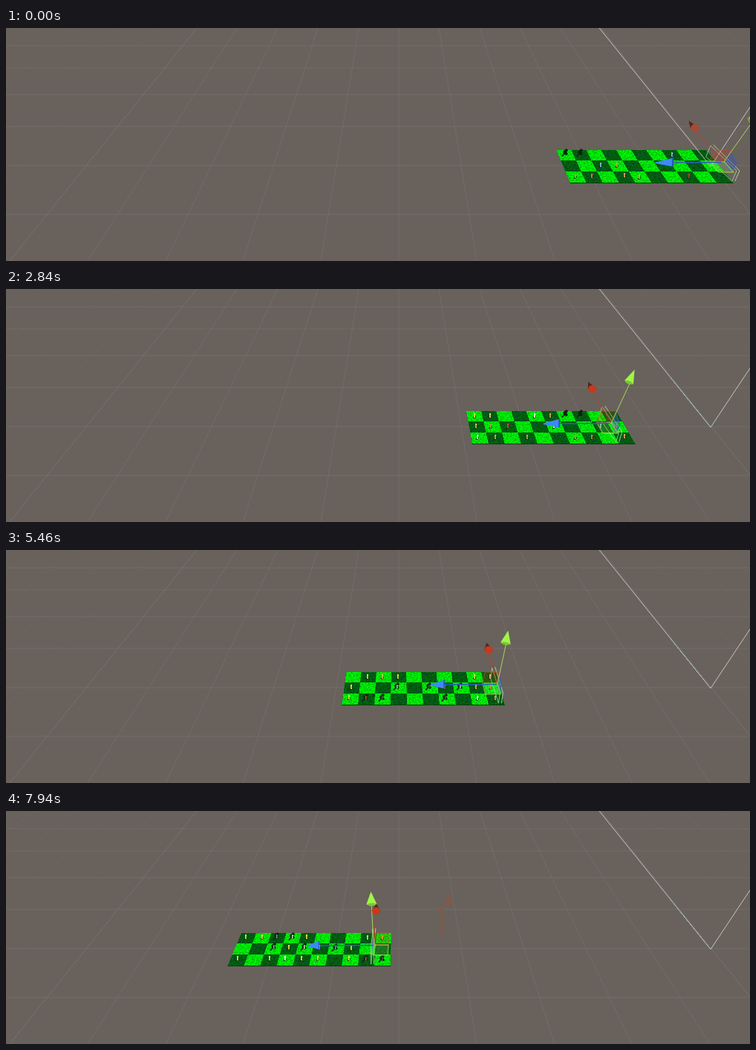
An HTML page without scripts that plays this animation: 1002x315 px, repeating every 8000 ms.

```html
<!DOCTYPE html>
<html lang="en">
<head>
<meta charset="utf-8">
<title>Endless board</title>
<style>
@property --p { syntax: "<number>"; inherits: true; initial-value: 20.7; }
@property --l { syntax: "<number>"; inherits: true; initial-value: 10.5; }

html, body { margin: 0; width: 100%; height: 100%; overflow: hidden; background: #69615c; }
svg { position: absolute; left: 0; top: 0; width: 1002px; height: 315px; overflow: hidden; }

/* --p: column of the moving object, --l: left edge of the ten visible columns */
.stage {
  position: relative; width: 1002px; height: 315px; overflow: hidden; background: #69615c;
  animation: walk 8s infinite, columns 8s step-end infinite;
}
.board {
  position: absolute; inset: 0;
  clip-path: polygon(
    calc(529px + 19.8px * var(--l)) 155px,
    calc(529px + 19.8px * (var(--l) + 10)) 155px,
    calc(529px + 22.08px * (var(--l) + 10)) 212px,
    calc(529px + 22.08px * var(--l)) 212px);
}
.tiles {
  position: absolute; left: 0; top: 0; width: 1240px; height: 120px;
  background: conic-gradient(#00e406 25%, #035a12 0 50%, #00e406 0 75%, #035a12 0) 0 0 / 80px 80px;
  box-shadow: inset 0 -2px #04400c;
  filter: url(#grain);
  transform-origin: 0 0;
  transform: matrix3d(.505, 0, 0, 0, -.36067, .23181, 0, -.0006818, 0, 0, 1, 0, 316.9, 165, 0, 1);
}

.grid { fill: none; stroke: #8fa3a3; stroke-opacity: .17; }
.far { stroke-opacity: .08; stroke-dasharray: 14 5; }

/* x is a screen offset, shifted with perspective by row */
.part {
  --k: 0; --b: 0;
  transform: matrix(calc(1 + var(--k) * var(--p)), 0, calc(var(--b) * var(--p)), 1, calc(529 + var(--a) * var(--p)), 0);
}
.up { --a: 27; --b: -.0325; }
.deep { --a: 13.59; --b: .042; }
.side { --a: 21; }
.back { --a: 19.26; }
.tip { --a: 23.16; --k: .0245; }
.lean { transform: matrix(1, calc(.026 * var(--p)), 0, 1, 0, 0); }

/* x is pixels per column at that point */
.ray { fill: none; transform: matrix(var(--p), 0, 0, 1, calc(529 + var(--o, 0)), 0); }
.ray, .plane { vector-effect: non-scaling-stroke; }
.plane { fill-opacity: .2; animation: flip 8s step-end infinite; }
.green { animation: green 8s infinite; }
.red { animation: red 8s infinite; }
.trace { animation: trace 8s step-end infinite; }
.dots { animation: dots 8s step-end infinite; }

@keyframes walk {
  0% { --p: 20.7; animation-timing-function: steps(11); }
  10.5% { --p: 19.26; animation-timing-function: steps(4); }
  14.375% { --p: 18.2; animation-timing-function: steps(7); }
  21.125% { --p: 16.3; animation-timing-function: steps(6); }
  26.875% { --p: 15; animation-timing-function: steps(5); }
  31.625% { --p: 14.1; animation-timing-function: steps(11); }
  42.25% { --p: 12.55; animation-timing-function: steps(1); }
  43.25% { --p: 12.34; animation-timing-function: steps(10); }
  52.75% { --p: 10.2; animation-timing-function: steps(11); }
  63.375% { --p: 7.36; animation-timing-function: steps(5); }
  68.25% { --p: 6.28; animation-timing-function: steps(6); }
  74.125% { --p: 4.98; animation-timing-function: steps(11); }
  84.625% { --p: 1.69; animation-timing-function: steps(15); }
  99.25%, 100% { --p: -1.6; }
}
@keyframes columns {
  0% { --l: 10.5; } 9.5% { --l: 9.5; } 13.6% { --l: 8.5; } 17.2% { --l: 7.5; }
  20.8% { --l: 6.5; } 25.1% { --l: 5.5; } 30.1% { --l: 4.5; } 36.4% { --l: 3.5; }
  43.1% { --l: 2.5; } 47.4% { --l: 1.5; } 51.9% { --l: .5; } 55.8% { --l: -.5; }
  59.5% { --l: -1.5; } 63.2% { --l: -2.5; } 67.8% { --l: -3.5; } 72.3% { --l: -4.5; }
  76% { --l: -5.5; } 79.2% { --l: -6.5; } 82.4% { --l: -7.5; } 85.9% { --l: -8.5; }
  90.4% { --l: -9.5; } 94.8%, 100% { --l: -10.5; }
}
@keyframes flip { 0% { transform: none; } 92.2%, 100% { transform: scaleX(-1); } }
@keyframes green { 0%, 15% { fill: #90b54a; } 24%, 100% { fill: #9ff548; } }
@keyframes red { 0% { fill: #a94a36; } 14% { fill: #99482a; } 26%, 100% { fill: #c8381d; } }
@keyframes trace { 0% { opacity: 0; } 81%, 100% { opacity: 1; } }
@keyframes dots { 0% { opacity: 0; } 12%, 100% { opacity: 1; } }
</style>
</head>
<body>
<div class="stage">
  <svg viewBox="0 0 1002 315">
    <defs>
      <filter id="grain" x="0" y="0" width="1" height="1" color-interpolation-filters="sRGB">
        <feTurbulence type="fractalNoise" baseFrequency=".24" numOctaves="2" seed="4"/>
        <feColorMatrix values="2.2 0 0 0 -.6  2.2 0 0 0 -.6  2.2 0 0 0 -.6  0 0 0 0 1"/>
        <feComposite in="SourceGraphic" operator="arithmetic" k1=".5" k2=".75"/>
      </filter>
      <g id="m">
        <path d="M-3 3L0 4L2 2L1 0Z" fill="#062a0c"/>
        <path d="M-1 -3H1V-1L.5 0L1 3H-1Z" fill="currentColor"/>
      </g>
      <g id="k">
        <path d="M-5 4L-2 1L-3 -2L-1 -4L2 -6L4 -4L2 -1L4 1L2 3L-1 2L-3 5Z" fill="#0a2a10"/>
        <path d="M0 -3L2 -2L1 0L2 2H0Z" fill="currentColor"/>
      </g>
    </defs>
    <g class="grid">
      <path d="M0 24H1002M0 54H1002M0 90H1002M0 133H1002M0 186H1002M0 252H1002"/>
      <path d="M529 0V315M475 0L424 315M583 0L634 315M420 0L319 315M638 0L739 315M366 0L215 315M692 0L843 315M311 0L110 315M747 0L948 315"/>
      <path d="M257 0L5 315M801 0L1053 315" stroke-opacity=".26"/>
      <path class="far" d="M203 0L-100 315M855 0L1158 315M148 0L-205 315M910 0L1263 315M94 0L-309 315M964 0L1367 315M39 0L-414 315"/>
    </g>
  </svg>

  <div class="board">
    <div class="tiles"></div>
    <svg viewBox="0 0 1002 315" color="#e0e048">
      <g>
        <use href="#m" x="323" y="170"/><use href="#m" x="345" y="170"/>
        <use href="#k" x="364" y="170" color="#8fa08a"/><use href="#k" x="385" y="170" color="#dfe8d8"/>
        <use href="#m" x="405" y="170"/><use href="#m" x="487" y="171"/>
        <use href="#m" x="507" y="171" color="#d8c04a"/><use href="#m" x="528" y="171"/>
        <use href="#m" x="631" y="171"/><use href="#m" x="652" y="171" color="#e0d8a0"/>
        <use href="#m" x="712" y="171" color="#eef2ea"/><use href="#m" x="733" y="171" color="#d0a850"/>
        <use href="#k" x="753" y="169" color="#0c180c"/><use href="#k" x="773" y="169" color="#0c180c"/>
        <use href="#m" x="897" y="171" color="#7fc4d8"/>
      </g>
      <g>
        <use href="#k" x="360" y="184" color="#9ab08a"/><use href="#m" x="381" y="184"/>
        <use href="#k" x="401" y="184" color="#e4ecd8"/><use href="#m" x="422" y="184" color="#eef2ea"/>
        <use href="#k" x="443" y="185" color="#9a90b0"/><use href="#m" x="465" y="185"/>
        <use href="#k" x="526" y="185" color="#d8c8dc"/><use href="#k" x="569" y="185" color="#3c6a40"/>
        <use href="#m" x="591" y="185" color="#c05a30"/><use href="#k" x="611" y="185" color="#dcd0e4"/>
        <use href="#m" x="633" y="185" color="#d8b848"/><use href="#m" x="653" y="185" color="#c09050"/>
        <use href="#m" x="676" y="185" color="#d84a28"/><use href="#m" x="738" y="185" color="#f0f0f0"/>
        <use href="#m" x="801" y="185" color="#7fb8e0"/><use href="#m" x="823" y="185" color="#e09a50"/>
      </g>
      <g>
        <use href="#m" x="312" y="199"/><use href="#m" x="355" y="199"/>
        <use href="#m" x="376" y="199" color="#eef2ea"/><use href="#m" x="398" y="199"/>
        <use href="#m" x="420" y="199"/><use href="#m" x="462" y="199"/>
        <use href="#k" x="484" y="200" color="#c05a30"/><use href="#k" x="506" y="200" color="#4a6a3a"/>
        <use href="#k" x="591" y="200" color="#8a4a3a"/><use href="#m" x="635" y="200" color="#dce4f0"/>
        <use href="#m" x="659" y="200" color="#d8a848"/><use href="#m" x="702" y="200" color="#c8a050"/>
        <use href="#m" x="767" y="200" color="#e08a48"/><use href="#m" x="789" y="200" color="#d87848"/>
        <use href="#m" x="833" y="199" color="#e0a060"/><use href="#m" x="853" y="201" color="#e09a50"/>
        <use href="#m" x="920" y="200" color="#c83a2a"/>
      </g>
    </svg>
  </div>

  <svg viewBox="0 0 1002 315">
    <path d="M799 0L949 187L1002 107" fill="none" stroke="#c4c6c0"/>
    <path class="dots" d="M895 120L949 187" stroke="#8fd0bc" stroke-dasharray="3 4"/>
    <g class="trace" fill="#7e5b4b" opacity="0">
      <path d="M596 110L602 124L597 129L590 125ZM581 131L589 129L587 141L584 139ZM587 140H591L589 165H585Z"/>
    </g>

    <g stroke-opacity=".8">
      <path class="ray" style="--o:-2.5" d="M20.4 159L22.1 193L21.8 207L20.1 174Z" stroke="#a8dc98"/>
      <path class="ray" style="--o:1.5" d="M20.4 158L22.1 193L21.8 207" stroke="#c6e6b4"/>
    </g>
    <path class="ray" d="M21.15 181L21.6 195L22 183L21.6 168Z" stroke="#3c5fc0" style="fill:#3c54b0;fill-opacity:.45"/>
    <g class="part up"><path class="plane" d="M0 181H-20V165H0Z" fill="#c8381d" stroke="#b4502c" stroke-opacity=".8"/></g>
    <g class="part deep"><path class="plane" d="M0 181H-20V195H0Z" fill="#8fe05a" stroke="#a4dc50"/></g>

    <path class="ray" d="M21.15 181L19.2 137" stroke="#b0452a"/>
    <path class="ray" d="M21.15 181L23 127" stroke="#a6d85c"/>
    <path class="part side" d="M-72 182L0 181.500" stroke="#2c5cc8" stroke-width="1.3"/>

    <path class="part deep" d="M0 125.500L6 135H-6Z" fill="#4e2818"/>
    <ellipse class="part back red" cx="0" cy="135" rx="5.5" ry="5" fill="#c8381d"/>
    <g class="part up">
      <g class="lean">
        <path class="green" d="M0 109L7 126Q0 131 -7 126Z" fill="#9ff548"/>
        <path d="M-7 126Q0 123 7 126Q0 131 -7 126Z" fill="#4c7a1c" fill-opacity=".4"/>
      </g>
    </g>
    <g class="part tip">
      <path d="M-89 181.500L-72.500 175.500V187.500L-89 183Z" fill="#4088fa"/>
      <path d="M-74 176L-72.500 175.500V187.500L-74 187Z" fill="#2a58b4"/>
    </g>
  </svg>
</div>
</body>
</html>
```
